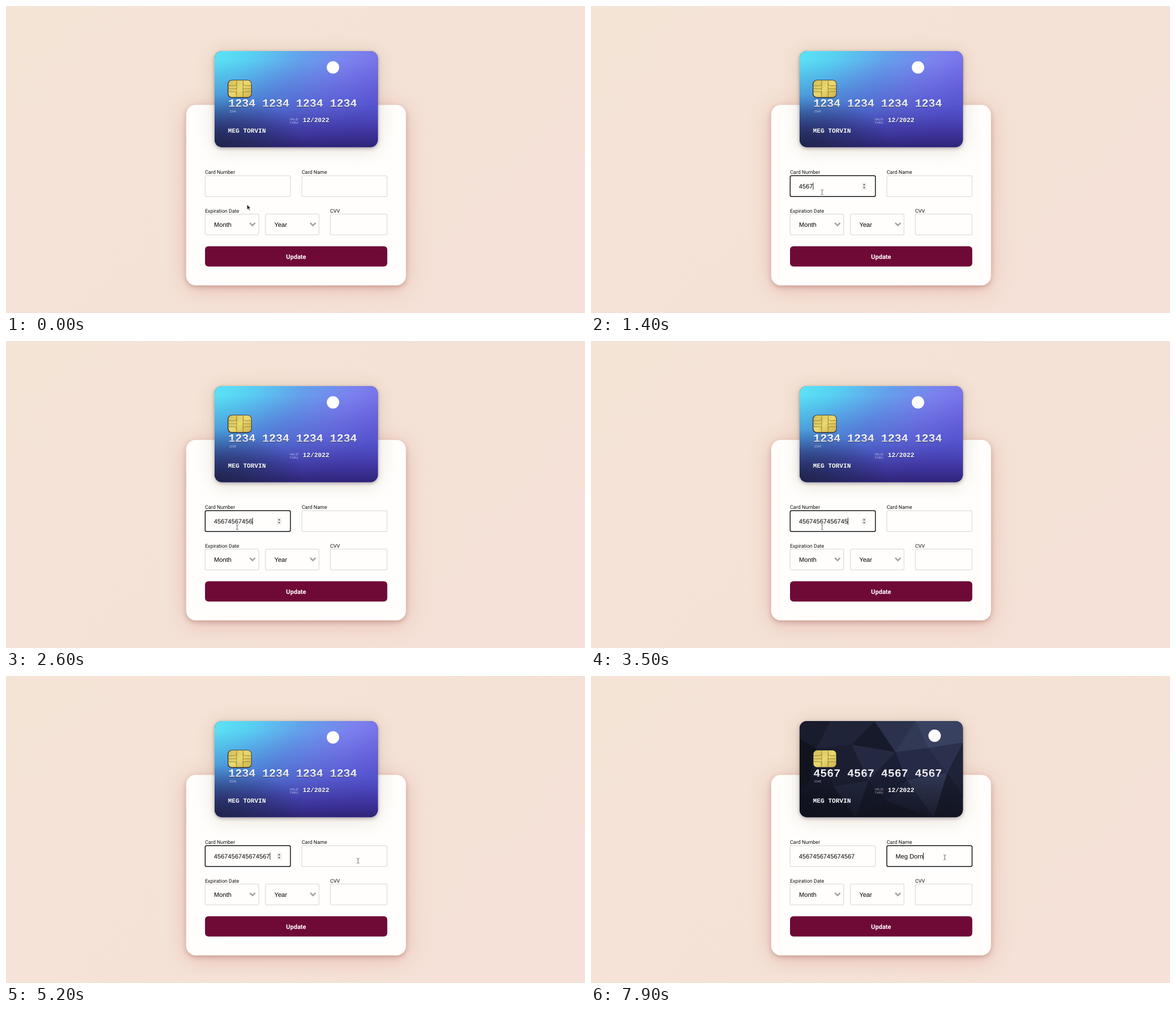
An HTML page for the animation above (8 s loop, 1027 by 545 pixels).

```html
<!DOCTYPE html>
<html lang="en">
<head>
<meta charset="utf-8">
<title>Card form</title>
<style>
  html, body { margin: 0; width: 100%; height: 100%; overflow: hidden; background: #f5e2d6; }
  svg { display: block; width: 100vw; height: 100vh; }
  text { text-rendering: geometricPrecision; white-space: pre; }
  .panel { fill: #fffefc; filter: drop-shadow(0 3px 4px rgba(120, 50, 40, .3)) drop-shadow(0 5px 18px rgba(190, 70, 60, .25)); }
  .plate { filter: drop-shadow(0 2px 3px rgba(50, 35, 50, .4)) drop-shadow(0 3px 16px rgba(150, 120, 80, .24)); }
  .label { font: 9px Roboto, sans-serif; fill: #111; }
  .value { font: 11.13px "Liberation Sans", Arial, sans-serif; fill: #000; }
  .button { font: bold 11.1px Roboto, sans-serif; fill: #fff; text-anchor: middle; }
  .field { fill: #fffefd; stroke: #dedddc; stroke-width: 1.3; }
  .field.focus { stroke: #141414; stroke-width: 1.5; }
  .chevron { fill: none; stroke: #a5a4a3; stroke-width: 2.6; }
  .mono { font: bold 11.2px "Liberation Mono", "Courier New", monospace; fill: #fff; }
  .number { font-size: 20px; }
  .shade { fill: #10122c; opacity: .55; }
  .tiny { font: 5.6px "Liberation Sans", Arial, sans-serif; fill: #fff; opacity: .62; }
  .chip path { fill: none; stroke: #85742f; stroke-width: .8; }
</style>
</head>
<body>
<svg viewBox="0 0 1027 545" preserveAspectRatio="none">
  <defs>
    <linearGradient id="page" x2="1" y2=".5">
      <stop stop-color="#f4e4d6"/><stop offset="1" stop-color="#f5e1d7"/>
    </linearGradient>
    <linearGradient id="sky" x2="1" y2=".42">
      <stop stop-color="#5ce4f5"/><stop offset=".2" stop-color="#57d0f2"/>
      <stop offset=".48" stop-color="#649fea"/><stop offset=".75" stop-color="#7b80ee"/>
      <stop offset="1" stop-color="#7468e6"/>
    </linearGradient>
    <linearGradient id="dusk" x2="0" y2="1">
      <stop offset=".1" stop-color="#3b3fb8" stop-opacity="0"/>
      <stop offset=".55" stop-color="#3540b4" stop-opacity=".45"/>
      <stop offset=".8" stop-color="#342c96" stop-opacity=".78"/>
      <stop offset="1" stop-color="#2c2172" stop-opacity=".97"/>
    </linearGradient>
    <radialGradient id="corner" cx="0" cy="1" r=".55">
      <stop stop-color="#1d2442" stop-opacity=".85"/><stop offset="1" stop-color="#1d2442" stop-opacity="0"/>
    </radialGradient>
    <linearGradient id="night" x1=".1" y1="1" x2=".8" y2="0">
      <stop stop-color="#10121e"/><stop offset=".55" stop-color="#1c2036"/><stop offset="1" stop-color="#353c5b"/>
    </linearGradient>
    <linearGradient id="floor" x2="0" y2="1">
      <stop offset=".55" stop-color="#10121d" stop-opacity="0"/><stop offset="1" stop-color="#10121d" stop-opacity=".75"/>
    </linearGradient>
    <linearGradient id="gold" x2="1" y2="1">
      <stop stop-color="#d3bd58"/><stop offset=".5" stop-color="#ead86e"/><stop offset="1" stop-color="#cfb24a"/>
    </linearGradient>
    <linearGradient id="silver" x2="0" y2="1">
      <stop offset=".35" stop-color="#fff"/><stop offset=".85" stop-color="#b4b4c0"/>
    </linearGradient>
    <clipPath id="plateClip"><rect x="370" y="80" width="289.5" height="170.5" rx="13"/></clipPath>
  </defs>

  <rect width="1027" height="545" fill="url(#page)"/>
  <rect class="panel" x="319.5" y="175.5" width="390" height="320.5" rx="17"/>
  <rect class="plate" x="370" y="80" width="289.5" height="170.5" rx="13" fill="#2b2b60"/>

  <g clip-path="url(#plateClip)">
    <g id="blueCard">
      <path d="M370 80h290v171h-290z" fill="url(#sky)"/>
      <path d="M370 80h290v171h-290z" fill="url(#dusk)"/>
      <path d="M370 80h290v171h-290z" fill="url(#corner)"/>
      <circle cx="580" cy="109" r="11" fill="#fff"/>
    </g>
    <g id="darkCard">
      <path d="M370 80h290v171h-290z" fill="url(#night)"/>
      <g id="facets"></g>
      <path d="M370 80h290v171h-290z" fill="url(#floor)"/>
      <circle cx="609.5" cy="106" r="11" fill="#fff"/>
    </g>
  </g>

  <g class="chip">
    <rect id="chipRim" x="393.2" y="131.2" width="42.6" height="32" rx="7.5" fill="#2c2a30"/>
    <rect x="394.5" y="132" width="40.4" height="29.8" rx="6.5" fill="url(#gold)"/>
    <path d="M395 141.500h10q4 0 4-4v-5M395 152h10q4 0 4 4v6M434.500 141.500h-10q-4 0-4-4v-5M434.500 152h-10q-4 0-4 4v6M395 147h14M420.500 147h14M409 137.500v19M420.500 137.500v19"/>
  </g>

  <text class="mono number shade" x="394.500" y="179.900"></text>
  <text class="mono number" x="394.500" y="178.500" style="fill:url(#silver)"></text>
  <text class="tiny" x="396" y="189.200">2345</text>
  <text class="tiny" x="503" y="202.800">VALID</text>
  <text class="tiny" x="503" y="208.800">THRU</text>
  <text class="mono shade" x="527" y="207">12/2022</text>
  <text class="mono" x="526.500" y="206">12/2022</text>
  <text class="mono shade" x="394.300" y="226">MEG TORVIN</text>
  <text class="mono" x="393.800" y="225">MEG TORVIN</text>

  <text class="label" x="353" y="298.400">Card Number</text>
  <text class="label" x="524.500" y="298.400">Card Name</text>
  <text class="label" x="353" y="366.600">Expiration Date</text>
  <text class="label" x="575" y="366.600">CVV</text>

  <rect id="numberField" class="field" x="353.300" y="301.300" width="151.200" height="37" rx="2.500"/>
  <rect id="nameField" class="field" x="524.700" y="301.300" width="151.200" height="37" rx="2.500"/>
  <rect class="field" x="353.300" y="369.400" width="95" height="37" rx="2.500"/>
  <rect class="field" x="460.200" y="369.400" width="95" height="37" rx="2.500"/>
  <rect class="field" x="575.300" y="369.400" width="100.600" height="37" rx="2.500"/>
  <text class="value" x="369" y="391.800">Month</text>
  <text class="value" x="476" y="391.800">Year</text>
  <path class="chevron" d="M432.500 385l4.700 4.700 4.700-4.700M539.700 385l4.700 4.700 4.700-4.700"/>

  <g id="spinner">
    <rect x="480.200" y="313.300" width="8.800" height="13" rx="1" fill="#efefee"/>
    <path d="M482.400 318.300l2.100-2.500 2.100 2.500zM482.400 321.500l2.100 2.500 2.100-2.500z" fill="#4a4a4a"/>
  </g>
  <text id="numberText" class="value" x="368.800" y="323.700"></text>
  <text id="nameText" class="value" x="540.300" y="323.700"></text>
  <rect id="caret" y="313.700" width=".9" height="12.300"/>

  <rect x="353" y="426.600" width="323.300" height="36" rx="6" fill="#6f0a37"/>
  <text class="button" x="514.600" y="448.500">Update</text>

  <g id="pointer">
    <path id="arrow" d="M0 0v9l2.100-1.900 1.500 3.300 1.500-.7-1.500-3.100h2.900z" fill="#222" stroke="#fff" stroke-width=".6"/>
    <path id="beam" d="M-2.200-4.400q2.200 0 2.200 1.200 0-1.200 2.200-1.200M0-3.200v6.400M-2.200 4.400q2.200 0 2.200-1.200 0 1.200 2.200 1.200" fill="none" stroke="#6b6b6b"/>
  </g>
</svg>
<script>
const LOOP = 8000, STEP = 100, BLINK = 600;
const FOCUS_NUMBER = 400, FOCUS_NAME = 5400;
const $ = id => document.getElementById(id);
const show = (id, on) => { $(id).style.display = on ? '' : 'none'; };

const numberEntry = {
  text: '4567'.repeat(4),
  times: [800, 1000, 1200, 1400, 1600, 1800, 2000, 2200, 2300, 2500, 2600, 2800, 3000, 3300, 3700, 3900]
};
const nameEntry = {
  text: 'Meg Dorn',
  times: [5900, 6300, 6500, 6700, 7300, 7500, 7700, 7900]
};

// time, x, y
const path = [
  [0, 427.5, 352.5], [400, 410, 330.5], [4200, 410, 330.5], [4700, 653, 387],
  [4800, 653, 387], [5200, 624.5, 328], [5300, 624.5, 328], [5400, 627.5, 322]
];
const inputs = [[353, 301, 505, 339], [524, 301, 676, 339], [575, 369, 676, 407]];

const facets = [
  ['370,80 425,80 400,128 370,112', '#191c2d'],
  ['425,80 503,80 462,122 400,128', '#202439'],
  ['503,80 540,135 462,122', '#171a2b'],
  ['503,80 575,80 540,135', '#2c324d'],
  ['575,80 660,80 660,118 598,128', '#394160'],
  ['575,80 598,128 540,135', '#323955'],
  ['598,128 660,118 632,172', '#2b314c'],
  ['540,135 598,128 632,172 560,185', '#252b46'],
  ['462,122 540,135 492,186', '#242941'],
  ['370,112 400,128 386,190 370,205', '#11141f'],
  ['400,128 462,122 492,186 430,196', '#1a1e30'],
  ['540,135 560,185 524,222 492,186', '#1a1f35'],
  ['632,172 660,118 660,215', '#1e2338'],
  ['632,172 608,251 560,185', '#303753'],
  ['632,172 660,215 608,251', '#191d30'],
  ['430,196 492,186 470,251', '#23283f'],
  ['492,186 524,222 470,251', '#161a2b'],
  ['524,222 560,185 608,251', '#212740']
];
$('facets').innerHTML = facets.map(([points, fill]) =>
  `<polygon points="${points}" fill="${fill}"/>`).join('');

const typed = ({ text, times }, t) => text.slice(0, times.filter(k => k <= t).length);

function position(t) {
  const next = path.findIndex(p => p[0] > t);
  if (next < 0) return path[path.length - 1].slice(1);
  const [t0, x0, y0] = path[next - 1], [t1, x1, y1] = path[next];
  const k = (t - t0) / (t1 - t0), ease = k * k * (3 - 2 * k);
  return [x0 + (x1 - x0) * ease, y0 + (y1 - y0) * ease];
}

function drawCaret(t, entry, field, focusTime) {
  const lastKey = Math.max(focusTime, ...entry.times.filter(k => k <= t));
  show('caret', t >= focusTime && Math.floor((t - lastKey) / BLINK) % 2 === 0);
  $('caret').setAttribute('x', +field.getAttribute('x') + field.getComputedTextLength());
}

function render(t) {
  const onName = t >= FOCUS_NAME, onNumber = t >= FOCUS_NUMBER && !onName;
  $('numberField').classList.toggle('focus', onNumber);
  $('nameField').classList.toggle('focus', onName);
  show('spinner', onNumber);
  show('blueCard', !onName);
  show('chipRim', !onName);
  show('darkCard', onName);

  const digits = onName ? '4567' : '1234';
  document.querySelectorAll('.number').forEach(el => { el.textContent = Array(4).fill(digits).join(' '); });
  $('numberText').textContent = typed(numberEntry, t);
  $('nameText').textContent = typed(nameEntry, t);
  if (onName) drawCaret(t, nameEntry, $('nameText'), FOCUS_NAME);
  else drawCaret(t, numberEntry, $('numberText'), FOCUS_NUMBER);

  const [x, y] = position(t);
  const overInput = inputs.some(([l, top, r, b]) => x > l && x < r && y > top && y < b);
  $('pointer').setAttribute('transform', `translate(${x} ${y})`);
  show('arrow', !overInput);
  show('beam', overInput);
}

const start = performance.now();
function tick() {
  const t = (performance.now() - start) % LOOP;
  render(Math.floor(t / STEP) * STEP);
  requestAnimationFrame(tick);
}
tick();
</script>
</body>
</html>
```
